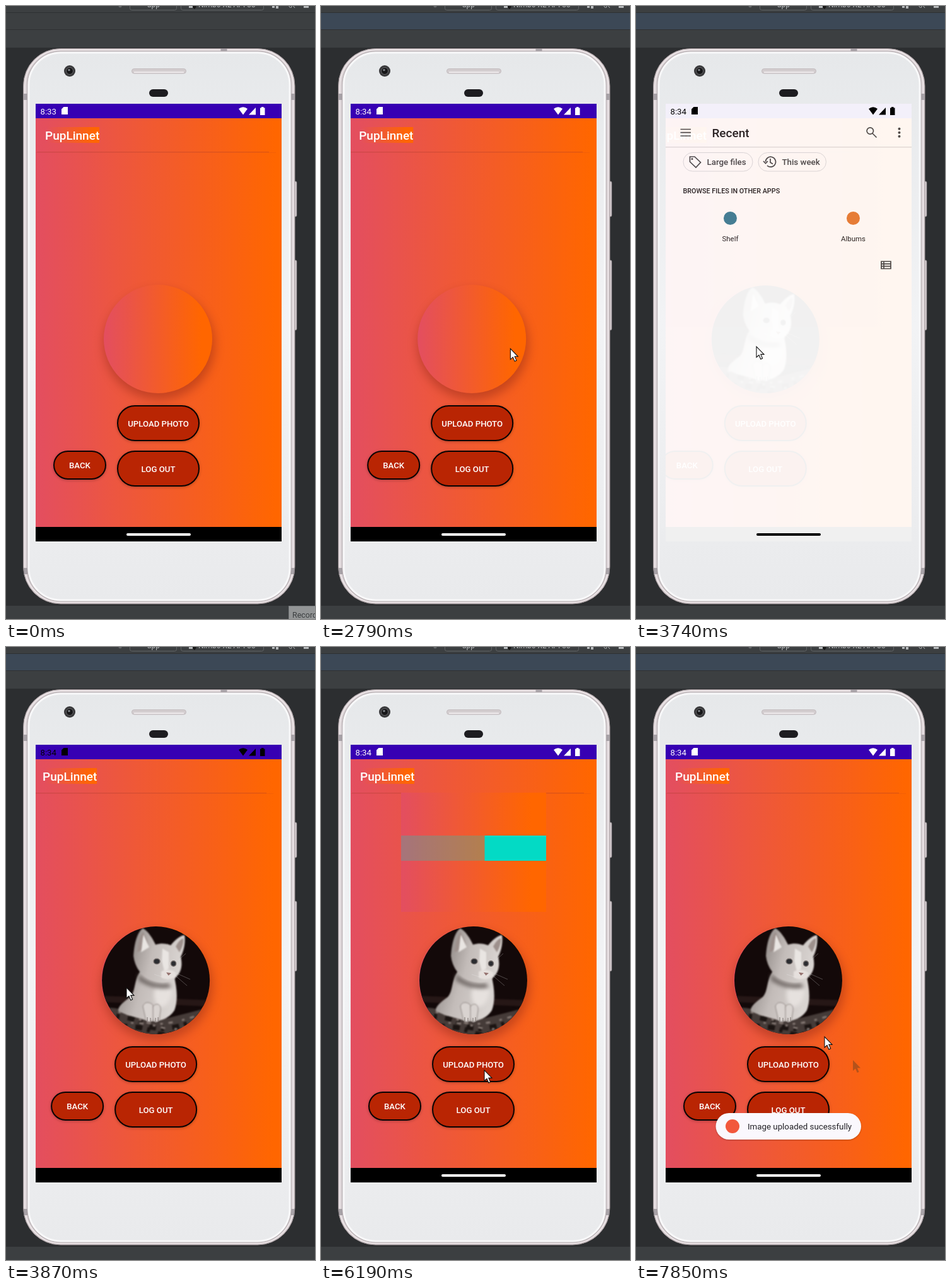
An HTML page that plays this animation: 490x972 px, repeating every 8 s.

```html
<!DOCTYPE html>
<html lang="en">
<head>
<meta charset="utf-8">
<title>Photo upload</title>
<style>
html, body { margin: 0; width: 100%; height: 100%; overflow: hidden; background: #2c2e30; }
svg { display: block; font-family: Roboto, sans-serif; }
#stage { width: 490px; height: 972px; }
.bold { font-weight: 500; }
.mid { text-anchor: middle; }
.button rect { fill: #b92503; stroke: #080303; stroke-width: 2; filter: drop-shadow(0 1px 2px #0004); }
.button text { font-size: 13.2px; font-weight: 500; fill: #fff; text-anchor: middle; }
.line { fill: none; stroke: #46494d; stroke-width: 1.7; }
.soft { filter: blur(1px); }
.softer { filter: blur(3px); }
</style>
</head>
<body>
<svg id="stage" viewBox="0 0 490 972">
  <defs>
    <linearGradient id="wide" gradientUnits="userSpaceOnUse" x1="47" x2="428" y1="0" y2="0">
      <stop stop-color="#e34e60"/><stop offset="1" stop-color="#ff6600"/>
    </linearGradient>
    <linearGradient id="local">
      <stop stop-color="#e34e60"/><stop offset=".9" stop-color="#ff6600"/>
    </linearGradient>
    <linearGradient id="shell" x2="0" y2="1">
      <stop stop-color="#e6e8ea"/><stop offset=".5" stop-color="#f2f3f5"/><stop offset="1" stop-color="#e9eaec"/>
    </linearGradient>
    <linearGradient id="coat" x2="1" y2=".25">
      <stop stop-color="#8f8885"/><stop offset=".45" stop-color="#c3bcb9"/><stop offset="1" stop-color="#d9d4d1"/>
    </linearGradient>
    <clipPath id="round"><circle cx="241.5" cy="528.5" r="85.5"/></clipPath>
    <path id="arrow" d="M0 0V17L4 13.5L6.8 20L9.6 18.8L6.8 12.4H12Z"/>
  </defs>

  <!-- desktop window -->
  <path fill="#3c3f41" d="M0 0H490V66H0ZM0 951H490V972H0Z"/>
  <rect id="strip" y="11" width="490" height="26"/>
  <path stroke="#2e3032" d="M0 10.5H490M0 37.5H490"/>
  <g fill="none" stroke="#626567">
    <rect x="196.500" y="-14" width="74" height="20.500" rx="3"/>
    <rect x="277.500" y="-14" width="131" height="20.500" rx="3"/>
  </g>
  <g fill="#b4b7b9" font-size="12">
    <text x="224" y="2">app</text>
    <text x="305" y="2">Nimbo XL API 33</text>
    <path d="M290 -4H296V3H290ZM422 -4H426V3H422ZM428 -2H432V4H428ZM472 -2H480V3H472Z"/>
    <path d="M447 -2L451 3M452 3L454 -2L458 3" stroke="#b4b7b9" fill="none"/>
    <circle cx="181" cy="0" r="2.500" fill="#626567"/>
  </g>
  <path fill="#161616" d="M297 -3L302 1L299 5L296 2Z"/>
  <g id="tip">
    <rect x="448.500" y="951.500" width="50" height="30" fill="#939596" stroke="#777a7c"/>
    <text x="454" y="970" font-size="12.500" fill="#3c3f41">Record</text>
  </g>

  <!-- phone -->
  <g fill="#d9d1d4" stroke="#8b8588" stroke-width=".8">
    <rect x="455" y="278" width="6" height="56" rx="2"/>
    <rect x="455" y="403" width="6" height="111" rx="2"/>
  </g>
  <rect x="27.500" y="67.500" width="430.500" height="880.500" rx="59" fill="#d9d1d4" stroke="#a09699"/>
  <rect x="30" y="69.500" width="425.500" height="876" rx="57" fill="none" stroke="#efe8ea" stroke-width="1.500"/>
  <path stroke="#77737a" stroke-width="10" opacity=".55" d="M28 144H35M450 144H457.500M28 896H35M450 896H457.500M345.500 67.500V72"/>
  <rect x="34" y="72" width="418" height="872" rx="53" fill="url(#shell)" stroke="#b9b1b4" stroke-width="1.500"/>
  <rect x="36" y="74" width="414" height="868" rx="51" fill="none" stroke="#f8f8f9" stroke-width="3"/>
  <circle cx="101" cy="103" r="9" fill="#39393b"/>
  <circle cx="101" cy="103" r="5.500" fill="#161618" stroke="#68686b"/>
  <circle cx="100" cy="101.500" r="1.700" fill="#7d8287"/>
  <rect x="199.500" y="99.500" width="86" height="7.500" rx="3.700" fill="#d3cdcf" stroke="#c2bbbe"/>
  <path stroke="#eee9eb" stroke-width="2" d="M203 105H282"/>
  <rect x="227" y="132" width="30" height="12" rx="6" fill="#1d1c20"/>

  <!-- screen -->
  <svg x="47" y="155" width="390" height="694" viewBox="47 155 390 694">
    <g id="app">
      <rect width="540" y="155" height="694" fill="url(#wide)"/>
      <path stroke="#a83a2a" opacity=".36" d="M49 231.500H417"/>
      <path stroke="#a83a2a" opacity=".12" d="M47 232.500H428"/>
      <rect x="62" y="192" width="86" height="25" fill="url(#local)"/>
      <text class="bold" x="62" y="211.500" font-size="19" fill="#fff">PupLinnet</text>
      <ellipse cx="243" cy="537" rx="88" ry="87" fill="#7a1c10" opacity=".38" style="filter:blur(8px)"/>
      <circle cx="241" cy="528" r="86" fill="url(#local)"/>
      <g id="photo" clip-path="url(#round)">
        <rect x="155" y="442" width="173" height="173" fill="#130909"/>
        <path class="soft" fill="#261716" d="M155 553L328 560V570L155 563Z"/>
        <g class="soft">
          <path fill="#453b38" d="M150 573Q180 568 205 582T262 588T332 570V620H150Z"/>
          <path fill="none" stroke="#1b1412" stroke-width="8" stroke-dasharray="11 8 5 13" d="M160 586Q195 582 225 599T325 584M172 602Q215 599 240 611T310 600"/>
          <path fill="none" stroke="#857974" stroke-width="3" stroke-dasharray="7 15 4 9" d="M160 578Q190 576 218 592T325 578M180 596Q220 594 250 603T315 592"/>
          <path fill="url(#coat)" d="M217 514C206 530 210 545 201 555C190 563 181 570 182 577C196 585 212 587 226 592C246 596 262 590 271 576C277 560 275 540 270 520Z"/>
        </g>
        <g class="softer">
          <path fill="#e6e1de" d="M243 536C236 550 238 560 246 570C258 574 265 560 268 546L264 530Z"/>
          <path fill="#6d6562" d="M214 518C226 531 244 537 262 533L266 540C246 544 224 537 214 528Z"/>
        </g>
        <g class="soft">
          <path fill="url(#coat)" d="M206 490C207 470 212 452 221 446C229 450 237 463 241 472C250 469 258 470 265 473C272 464 281 457 287 457C289 470 285 484 281 491C284 505 282 515 274 523C267 531 255 533 245 531C224 528 209 513 206 490Z"/>
          <path fill="#9d908c" d="M212 484C213 468 217 457 221 452C226 459 229 467 230 475C222 479 217 481 212 484ZM273 475C277 467 281 463 285 462C286 470 282 479 279 484Z"/>
          <path fill="#e9e5e2" d="M218 484C220 474 220 464 222 456L231 476ZM252 478L262 484L262 510L255 514L251 498Z"/>
          <path fill="#e6e0dd" d="M250 515Q258 509 270 514Q276 519 271 524Q260 530 250 524Z"/>
          <g fill="#d9d3d0" stroke="#8d8481">
            <path d="M221 570C223 562 232 562 237 568L238 588C235 597 226 596 225 588Z"/>
            <path d="M237 570C243 563 250 567 249 576L247 590C244 597 238 596 237 588Z"/>
          </g>
        </g>
        <g fill="#2b2c30" stroke="#776f6d" stroke-width="1.500">
          <ellipse cx="243" cy="498.500" rx="5" ry="4.200"/><ellipse cx="269.500" cy="502" rx="4" ry="4.200"/>
        </g>
        <path fill="#94706d" d="M258 516L266 517L261.500 521Z"/>
        <path fill="none" stroke="#eee6" stroke-width=".7" d="M271 516L296 527M270 519L291 537M254 524L239 519M277 497L289 486"/>
        <path stroke="#7b726f" d="M228 587V593M233 588V594M241 588V594M245 587V593"/>
      </g>
      <g class="button"><rect x="177" y="634" width="129" height="55" rx="27.500"/><text x="241.500" y="666.500">UPLOAD PHOTO</text></g>
      <g class="button"><rect x="177" y="706" width="129" height="55" rx="27.500"/><text x="241.500" y="738.500">LOG OUT</text></g>
      <g class="button"><rect x="76" y="706" width="82" height="44" rx="22"/><text x="117" y="733">BACK</text></g>
    </g>

    <g id="dialog">
      <rect x="127" y="231" width="230" height="189" fill="url(#local)"/>
      <svg x="127" y="299" width="230" height="40" fill="#03dac5">
        <rect width="230" height="40" opacity=".27"/>
        <rect id="first" height="40"/>
        <rect id="second" height="40"/>
      </svg>
    </g>

    <rect x="47" y="155" width="390" height="23" fill="#3700b3"/>
    <rect x="47" y="826" width="390" height="23"/>

    <g id="picker">
      <rect x="47" y="155" width="390" height="694" fill="#fff"/>
      <path stroke="#dfe0e2" d="M47 223.500H437"/>
      <path stroke="#f1f1f2" d="M47 224.500H437"/>
      <g id="files" fill="#202124">
        <path class="line" d="M72 195.500H88.500M72 200.700H88.500M72 206H88.500"/>
        <text class="bold" x="122" y="208" font-size="19">Recent</text>
        <circle class="line" cx="372.800" cy="198" r="5.200"/>
        <path class="line" stroke-width="2" d="M376.500 202L383 208.500"/>
        <g fill="#46494d"><circle cx="419" cy="194.800" r="2"/><circle cx="419" cy="200.800" r="2"/><circle cx="419" cy="206.800" r="2"/></g>
        <g fill="none" stroke="#dadce0">
          <rect x="76.500" y="232.500" width="110" height="29.500" rx="14.700"/>
          <rect x="195.500" y="232.500" width="107.500" height="29.500" rx="14.700"/>
        </g>
        <path class="line" d="M87 239H94.500L104 248L96.500 256L87 247Z"/>
        <circle cx="90.500" cy="242.500" r="1.500" fill="#46494d"/>
        <path class="line" d="M207 247A8 8 0 1 1 209.500 253M203.500 246L207 249.500L210.500 246M214.500 242V248L218.500 250.500"/>
        <g class="bold" font-size="13.300" fill="#45484c">
          <text x="114" y="252">Large files</text>
          <text x="233" y="252">This week</text>
        </g>
        <text class="bold" x="76" y="297" font-size="10.800">BROWSE FILES IN OTHER APPS</text>
        <circle cx="151" cy="336.500" r="10.500" fill="#3b8099"/>
        <circle cx="346" cy="336.500" r="10.500" fill="#e57e39"/>
        <g class="mid" font-size="11.400">
          <text x="151" y="373">Shelf</text>
          <text x="346" y="373">Albums</text>
        </g>
        <path class="line" d="M390.500 405H405.500V416.500H390.500ZM390 408.800H406M390 412.700H406M394.500 405V416.500"/>
      </g>
    </g>

    <g id="status">
      <text id="clock" x="54.500" y="171.500" font-size="13.200"></text>
      <path d="M91.500 160H98V172H88V163.500ZM369 163Q376 157.500 383 163L376 172.500ZM385 172.500L396 161V172.500ZM403 161.500H405V160H408.500V161.500H410.500V173H403Z"/>
      <rect x="191" y="836" width="102" height="4" rx="2"/>
    </g>

    <g id="toast">
      <rect x="126.500" y="739" width="230.500" height="42" rx="21" fill="#faf8fd" style="filter:drop-shadow(0 1px 1px #0004)"/>
      <circle cx="153" cy="760" r="11" fill="#f2583c"/>
      <text x="177" y="765" font-size="13.300" fill="#222126">Image uploaded sucessfully</text>
    </g>
  </svg>

  <use id="ghost" href="#arrow" x="344" y="655" fill="#a8501c"/>
  <use id="cursor" href="#arrow" fill="#fff" stroke="#111" stroke-width="1.100"/>
</svg>

<script>
const LOOP = 8000, OPEN = 2757, CLOSE = 3700, SPIN = 5147, SLIDE = 39;
const $ = id => document.getElementById(id);
const clamp = v => Math.min(1, Math.max(0, v));
const ramp = (t, from, to) => clamp((t - from) / (to - from));
const show = (id, opacity) => $(id).setAttribute('opacity', +opacity);
const move = (id, x, y = 0) => $(id).setAttribute('transform', `translate(${x} ${y})`);

// y of a cubic Bezier easing at x
function bezier(x, [x1, y1, x2, y2]) {
  const at = (s, a, b) => 3 * (1 - s) ** 2 * s * a + 3 * (1 - s) * s * s * b + s ** 3;
  let low = 0, high = 1;
  for (let i = 0; i < 24; i++) {
    const s = (low + high) / 2;
    if (at(s, x1, x2) < x) low = s; else high = s;
  }
  return at(low, y1, y2);
}

// keys: [time, values, easing towards the next key]
function track(keys, t) {
  if (t <= keys[0][0]) return keys[0][1];
  const i = keys.findIndex(k => k[0] > t);
  if (i < 0) return keys[keys.length - 1][1];
  const [t0, from, ease = [.4, 0, .4, 1]] = keys[i - 1], [t1, to] = keys[i];
  const e = bezier((t - t0) / (t1 - t0), ease);
  return from.map((v, n) => v + (to[n] - v) * e);
}

// fast out, extra slow in
function slide(x) {
  return x < 1 / 6 ? .4 * bezier(x * 6, [.3, 0, .8, .15])
    : .4 + .6 * bezier((x - 1 / 6) * 1.2, [.05, .7, .1, 1]);
}

const pointer = [
  [270, [455, 975]], [800, [200, 448]], [1070, [322, 594]], [1400, [244, 535]],
  [1790, [265, 528]], [2450, [265, 528]], [2720, [300, 543]], [2920, [301, 544]],
  [3050, [301, 544]], [3400, [191, 540]], [3870, [191, 540]], [4400, [263, 652]],
  [4730, [259, 671]], [6720, [259, 671]], [7000, [344, 655]], [7350, [299, 618]]
];

// indeterminate bars: centre and width as parts of the track
const bars = {
  first: {
    centre: [[.2, [-.9517], [.5, 0, .7017, .4958]], [.5915, [-.115], [.3024, .3814, .55, .9564]], [1, [1.0544]]],
    width: [[.3665, [.08], [.3347, .1248, .7858, 1]], [.6915, [.6615], [.06, .11, .6, 1]], [1, [.08]]]
  },
  second: {
    centre: [[0, [-.0489], [.15, 0, .5151, .4097]], [.25, [.3276], [.3103, .2841, .8, .7337]],
      [.4835, [.795], [.4, .627, .6, .902]], [1, [1.5539]]],
    width: [[0, [.08], [.205, .0571, .5766, .454]], [.1915, [.4571], [.1523, .1964, .6484, 1.0043]],
      [.4415, [.728], [.2578, -.0032, .2118, 1.3818]], [1, [.08]]]
  }
};

function draw(now) {
  const t = now % LOOP;

  show('tip', t < 70);
  $('strip').setAttribute('fill', t < 2390 ? '#3c3f41' : '#3c4856');
  $('clock').textContent = t < 2450 ? '8:33' : '8:34';

  const opened = slide(ramp(t, OPEN, OPEN + 450));
  const closed = slide(ramp(t, CLOSE, CLOSE + 450));
  move('app', SLIDE * (closed - opened));
  move('files', SLIDE * (1 - opened + closed) - 4.3);
  show('picker', ramp(t, OPEN + 50, OPEN + 133) - ramp(t, CLOSE + 35, CLOSE + 118));
  show('photo', t > 3500);
  $('status').setAttribute('fill', t > 2990 && t < 3960 ? '#000' : '#fff');

  show('dialog', ramp(t, 5000, 5100) - ramp(t, 7050, 7150));
  const phase = Math.max(0, t - SPIN) / 2000 % 1;
  for (const id in bars) {
    const [centre] = track(bars[id].centre, phase), [width] = track(bars[id].width, phase);
    $(id).setAttribute('x', 230 * (centre - width / 2));
    $(id).setAttribute('width', 230 * width);
  }

  show('toast', ramp(t, 7400, 7800));
  show('ghost', t > 7060 ? .85 : 0);
  show('cursor', t >= 270);
  move('cursor', ...track(pointer, t));
}

let start;
requestAnimationFrame(function tick(now) {
  start ??= now;
  draw(now - start);
  requestAnimationFrame(tick);
});
draw(0);
</script>
</body>
</html>
```
